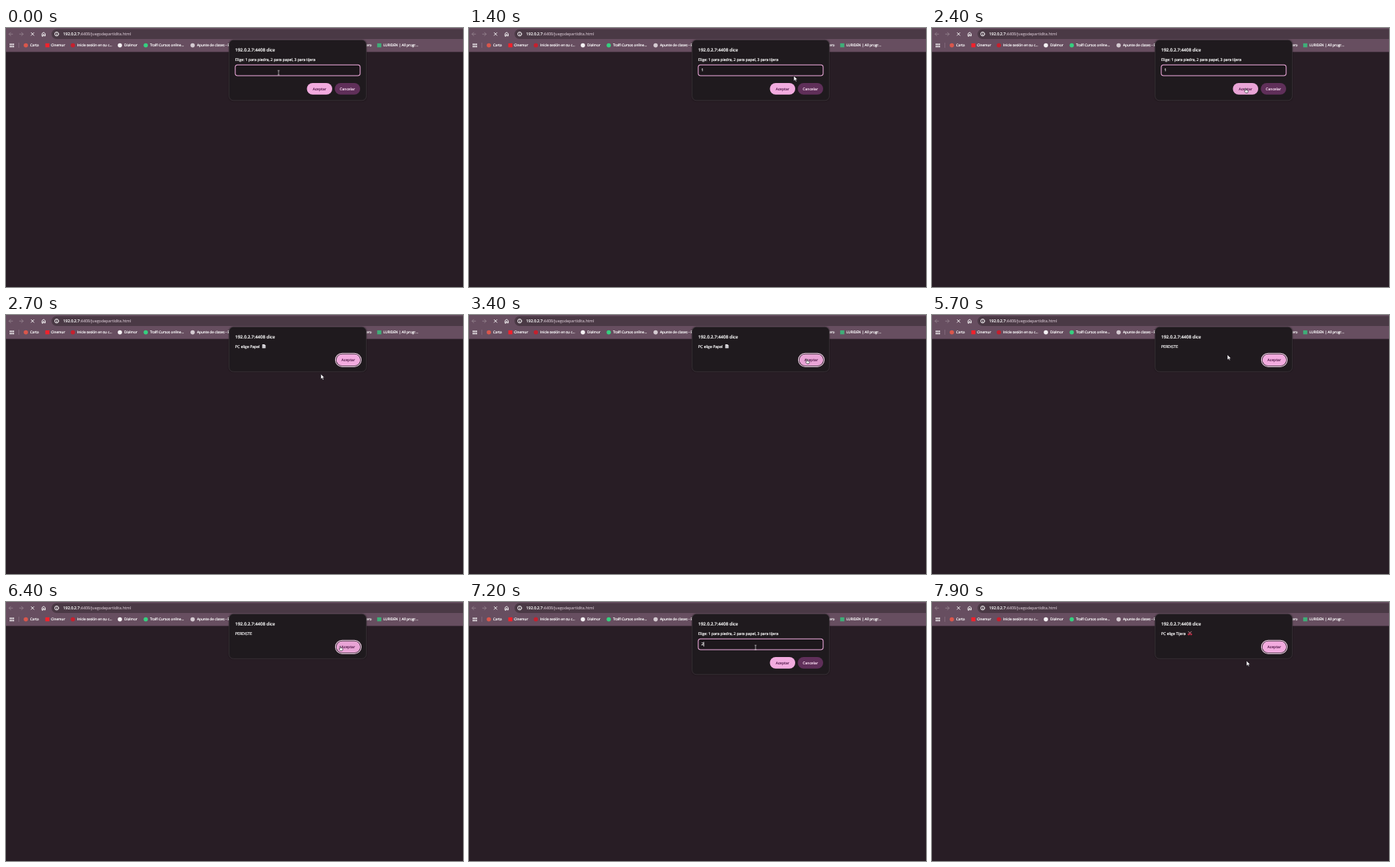
These frames come from a looping animation (622 px wide and 353 px high, 8000 ms). An HTML page:

```html
<!DOCTYPE html>
<html lang="es">
<head>
<meta charset="utf-8">
<title>Piedra, papel o tijera</title>
<style>
  html, body { margin: 0; width: 100%; height: 100%; overflow: hidden; background: #281d25; }
  svg { display: block; width: 622px; height: 353px; }
  text { font-family: "Open Sans", "Noto Sans", sans-serif; font-size: 5.13px; fill: #fff; stroke: #fff; stroke-width: .2; text-rendering: geometricPrecision; white-space: pre; }
  .mark text { font-size: 4.75px; }
  .url { font-size: 5.35px; fill: #cdbdc8; stroke: #cdbdc8; stroke-width: .1; }
  .host { fill: #fff; stroke: #fff; stroke-width: .2; }
  .title { font-size: 6px; font-weight: 600; stroke-width: .15; }
  .btn { font-size: 4.95px; font-weight: 600; text-anchor: middle; stroke-width: .1; }
  .okText { fill: #5b2152; stroke: #5b2152; }
  .noText { fill: #fbe0f4; stroke: #fbe0f4; }
  .line { fill: none; stroke: #fff; stroke-width: .9; stroke-linecap: round; stroke-linejoin: round; }
  .dim { stroke: #93808d; }
  .panel { fill: #1f1a1e; stroke: #40383e; stroke-width: .7; }
  .shade { fill: #000; opacity: .1; }
  .ok { fill: #f2abdf; }
  .ok.hover { fill: #e9a4d6; }
  .pointer { fill: #fff; stroke: #17101a; stroke-width: .6; stroke-linejoin: round; }
</style>
</head>
<body>
<svg viewBox="0 0 622 353">
  <rect width="622" height="353" fill="#281d25"/>
  <rect width="622" height="32.6" fill="#674e60"/>
  <rect x="62" y="1.5" width="580" height="13.5" rx="6.7" fill="#4a3945"/>

  <path class="line dim" d="M9 8.3H4.2M6.4 6L4.1 8.3L6.4 10.6M18.5 8.3H23.3M21.1 6L23.4 8.3L21.1 10.6"/>
  <path class="line" d="M34.3 6.4L38 10.1M38 6.4L34.3 10.1"/>
  <path class="line" d="M49 10.8V7.7L51.2 5.9L53.4 7.7V10.8H52V8.9H50.4V10.8Z"/>
  <circle class="line" cx="69" cy="8.2" r="2.7"/>
  <path class="line" d="M69 8.1V9.6M69 6.7V6.8"/>
  <text class="url" x="77.8" y="10.2"><tspan class="host">192.0.2.7</tspan>:4408/juegodepartidita.html</text>

  <g id="marks" class="mark">
    <path d="M17.5 20V27" stroke="#8a7183" stroke-width=".7"/>
  </g>

  <g id="prompt">
    <rect class="shade" x="302" y="15" width="190" height="86" rx="7"/>
    <rect class="panel" x="303.6" y="16.3" width="186.8" height="82.5" rx="6"/>
    <text class="title" x="312" y="32.4">192.0.2.7:4408 dice</text>
    <text x="312" y="44.5">Elige: 1 para piedra, 2 para papel, 3 para tijera</text>
    <rect x="312" y="50.2" width="170" height="14.7" rx="3.2" fill="#1d171c" stroke="#f2acdf" stroke-width="1.05"/>
    <text id="value" x="316.2" y="59.4"></text>
    <rect id="caret" y="54.4" width=".8" height="6.2" fill="#fff"/>
    <rect class="ok" x="409.5" y="75" width="34.5" height="15.8" rx="7.9"/>
    <text class="btn okText" x="426.7" y="84.8">Aceptar</text>
    <rect x="447.5" y="75" width="34.5" height="15.8" rx="7.9" fill="#5f2f59"/>
    <text class="btn noText" x="464.7" y="84.8">Cancelar</text>
  </g>

  <g id="alert">
    <rect class="shade" x="302" y="15" width="190" height="64" rx="7"/>
    <rect class="panel" x="303.6" y="16.3" width="186.8" height="61" rx="6"/>
    <text class="title" x="312" y="32.4">192.0.2.7:4408 dice</text>
    <text id="message" x="312" y="44.5"></text>
    <g id="paper">
      <path d="M348.8 39.9H351.8L353.3 41.4V45.2H348.8Z" fill="#e8e6ea"/>
      <path d="M349.6 41.7H351.2M349.6 42.9H352.5M349.6 44.1H352.5" stroke="#82808c" stroke-width=".5"/>
    </g>
    <g id="rock">
      <path d="M351.1 43.3L352.5 40.5L354.5 39.9L356.2 41.7L356.8 44L355.6 45.3H352.1Z" fill="#d6d3d5"/>
      <path d="M352.5 40.5L353.6 42.7L356.2 41.7M353.6 42.7L352.8 45.2" fill="none" stroke="#8d888c" stroke-width=".5"/>
    </g>
    <g id="scissors" fill="none" stroke-width=".9" stroke-linecap="round">
      <path d="M349 40.2L352 43.4M353 40.2L350 43.4" stroke="#aaa2aa"/>
      <path d="M349.6 40.8L352 43.3M352.4 40.8L350 43.3" stroke="#c83a50" stroke-width=".7"/>
      <circle cx="349.4" cy="44.1" r=".9" stroke="#d8304a"/>
      <circle cx="352.6" cy="44.1" r=".9" stroke="#d8304a"/>
    </g>
    <rect x="448.4" y="52.2" width="35" height="18.2" rx="9.1" fill="#1f1a1e" stroke="#f6d4ec" stroke-width="1.1"/>
    <rect class="ok" x="449.7" y="53.5" width="32.4" height="15.6" rx="7.8"/>
    <text class="btn okText" x="465.8" y="63.2">Aceptar</text>
  </g>

  <g id="cursor">
    <path id="arrow" class="pointer" d="M0 0V7.2L1.7 5.7L2.8 8.1L4 7.5L2.9 5.2H5.1Z"/>
    <path id="hand" class="pointer" d="M.2 .5Q.8 -.4 1.4 .5V2.6L2.9 2.8L4.2 3.3V5L3.6 6.5H.9L-.8 4.3Q-.8 3.4 .2 3.9Z"/>
    <path id="beam" d="M-1.3 -3H1.3M0 -3V3M-1.3 3H1.3" fill="none" stroke="#d9d2d7" stroke-width=".7"/>
  </g>
</svg>
<script>
const LOOP = 8000, STEP = 100;
const $ = id => document.getElementById(id);
const show = (id, on) => { $(id).style.display = on ? "" : "none"; };

function add(tag, attrs, text = "") {
  const el = document.createElementNS("http://www.w3.org/2000/svg", tag);
  for (const key in attrs) el.setAttribute(key, attrs[key]);
  el.textContent = text;
  $("marks").append(el);
}

// Bookmarks: icon centre, icon shape, colour, text start, label
const bookmarks = [
  [27, "circle", "#d9574c", 32.8, "Carta"],
  [56.3, "square", "#f0222c", 61.3, "Cinemur"],
  [91, "circle", "#c5202e", 97, "Inicie sesión en su c..."],
  [155, "circle", "#f4f1f3", 161, "Dialmor"],
  [190.2, "circle", "#35d07f", 196, "Tralfi Cursos online..."],
  [254, "circle", "#d5cbd2", 260, "Apunte de clases - Estudio"],
  [475, "square", "#3c7bd0", 481.3, "Tablero"],
  [508, "square", "#3fae78", 513.6, "LURIDEN | All progr..."]
];
for (const [x, shape, fill, textX, label] of bookmarks) {
  if (shape === "circle") add("circle", { cx: x, cy: 23.6, r: 2.9, fill });
  else add("rect", { x: x - 2.8, y: 20.9, width: 5.6, height: 5.4, fill });
  add("text", { x: textX, y: 25.3 }, label);
}
for (let i = 0; i < 6; i++) {
  add("rect", { x: 5 + i % 3 * 2.2, y: 21.3 + Math.floor(i / 3) * 3, width: 1.5, height: 2, fill: "#fff" });
}

// Dialogs: start, message (none for the prompt), icon
const dialogs = [
  [0],
  [2500, "PC elige Papel", "paper"],
  [3600, "tu eliges Piedra", "rock"],
  [4800, "PERDISTE"],
  [6600],
  [7800, "PC elige Tijera", "scissors"]
];

// Input: start of the caret blink, typed value
const typing = [[-500, ""], [900, "1"], [6600, ""], [7000, "2"]];

// Pointer hot spot: time, x, y
const path = [
  [0, 371, 61], [100, 371, 61], [400, 418, 38], [700, 468, 31], [900, 468, 31],
  [1300, 445, 62], [1700, 426, 82], [2600, 426, 82], [3200, 459, 60], [3600, 459, 60],
  [3900, 489, 67], [4400, 451, 62], [4800, 451, 62], [5100, 488, 58], [5400, 460, 57],
  [5700, 402, 54], [6100, 412, 54], [6500, 462, 61], [6600, 462, 61], [7100, 390, 62],
  [7300, 390, 62], [7700, 428, 80], [LOOP, 428, 80]
];

const latest = (list, t) => list.filter(item => item[0] <= t).pop();

function pointerAt(t) {
  const i = path.findIndex(p => p[0] > t);
  const [t0, x0, y0] = path[i - 1], [t1, x1, y1] = path[i];
  const u = (t - t0) / (t1 - t0), e = u * u * (3 - 2 * u);
  return [x0 + (x1 - x0) * e, y0 + (y1 - y0) * e];
}

const inside = (x, y, l, t, r, b) => x >= l && x <= r && y >= t && y <= b;

function draw(t) {
  const [, message, icon] = latest(dialogs, t);
  const asking = !message;
  show("prompt", asking);
  show("alert", !asking);
  $("message").textContent = message || "";
  for (const id of ["paper", "rock", "scissors"]) show(id, id === icon);

  const [since, value] = latest(typing, t);
  $("value").textContent = value;
  $("caret").setAttribute("x", value ? 319.3 : 316.4);
  show("caret", (t - since) % 1000 < 500);

  const [x, y] = pointerAt(t);
  const onInput = asking && inside(x, y, 312, 50, 482, 65);
  const onAccept = asking ? inside(x, y, 409, 75, 444, 91) : inside(x, y, 448, 52, 484, 70);
  const onCancel = asking && inside(x, y, 447, 75, 482, 91);
  const onButton = onAccept || onCancel;
  show("beam", onInput);
  show("hand", onButton);
  show("arrow", !onInput && !onButton);
  $("cursor").setAttribute("transform", `translate(${x} ${y})`);
  document.querySelectorAll(".ok").forEach(el => el.classList.toggle("hover", onAccept));
}

function tick() {
  draw(Math.floor(performance.now() % LOOP / STEP) * STEP);
  requestAnimationFrame(tick);
}
tick();
</script>
</body>
</html>
```
